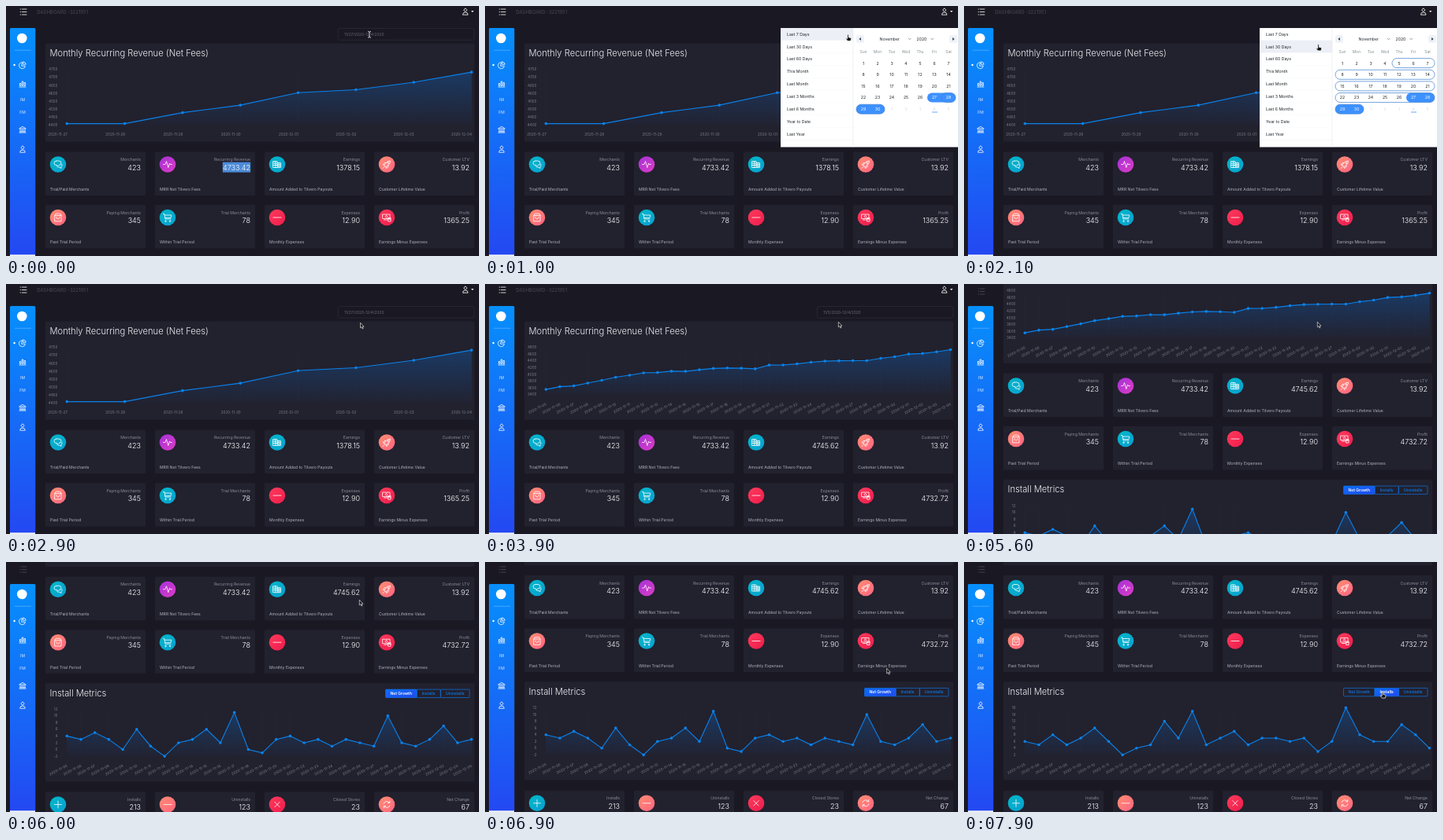
An HTML page for the animation above (8 s loop, 600 px wide and 318 px high).

```html
<!DOCTYPE html>
<html lang="en">
<head>
<meta charset="utf-8">
<title>Dashboard</title>
<style>
  html, body { margin: 0; width: 100%; height: 100%; overflow: hidden; background: #1a1923; }
  svg { display: block; width: 100vw; height: 100vh; }
  text { font-family: Inter, "Open Sans", sans-serif; font-weight: 400; }
  .title { font-size: 11.2px; font-weight: 300; fill: #f0f0f4; }
  .label { font-size: 5.15px; fill: #8e8d99; }
  .foot { font-size: 5.1px; fill: #b4b3bd; }
  .value { font-size: 9px; font-weight: 300; fill: #fff; }
  .tick { font-size: 4.6px; fill: #7f7e8b; }
  .icon { fill: none; stroke: #fff; stroke-width: .8; stroke-linecap: round; stroke-linejoin: round; }
  .pop { font-size: 5.2px; fill: #1d2429; }
  .end { text-anchor: end; }
  .mid { text-anchor: middle; }
</style>
</head>
<body>
<svg id="stage" viewBox="0 0 600 318" preserveAspectRatio="none"></svg>
<script>
const LOOP = 8000;
const POPUP_OPEN = 500, POPUP_CLOSE = 2900, RANGE_SET = 3300, TAB_CLICK = 7400;
const $ = id => document.getElementById(id);
const range = n => [...Array(n).keys()];
const text = (x, y, s, cls, extra = '') => `<text x="${x}" y="${y}" class="${cls}" ${extra}>${s}</text>`;
const rect = (x, y, w, h, fill, extra = '') =>
  `<rect x="${x}" y="${y}" width="${w}" height="${h}" fill="${fill}" ${extra}/>`;
const icon = (x, y, d, extra = '') => `<path class="icon" transform="translate(${x} ${y})" d="${d}" ${extra}/>`;

const gradients = {
  teal: ['#00b9c9', '#0a9fd0'], purple: ['#a532d8', '#dc3cc4'],
  coral: ['#ff8d72', '#ff6481'], red: ['#ff3b5c', '#ee1c4c'],
  side: ['#0690fc', '#2448f2'], tab: ['#0d6df5', '#2348f0']
};
const paths = {
  chat: 'M-2-4.5H1Q4-4.5 4-1.5Q4 1 1 1L-1 3V1H-2Q-5 1-5-1.7Q-5-4.5-2-4.5M0 3.5H2L4 5V3Q5.5 2 5 0',
  pulse: 'M-5.5 0H-3L-1.5-4L.8 4L2.5-1.5L3.4 0H5.5',
  coins: 'M-5-4H0V4H-5ZM-5-1.5H0M-5 1H0M0-2H4.5V4H0M0 0H4.5M0 2H4.5M-2.5-4V4M2.2-2V4',
  rocket: 'M-3 1Q-1-4 4.5-4.5Q4 1-1 3ZM-3 1L-5 .5L-3-2H-1M-1 3L-.5 5L2 3V1M-3 3L-5 5M1.8-2.8A1 1 0 1 0 1.9-2.8',
  bag: 'M-4-2.5L-2.8-4.8H2.8L4-2.5V4.8H-4ZM-4-2.5H4M-2-.5Q-2 2 0 2Q2 2 2-.5',
  cart: 'M-5.5-4.5H-4L-3 2H4M-3.7-3H4.8L4 .5H-3.2M-2.5 4A.8.8 0 1 0-2.4 4M3 4A.8.8 0 1 0 3.1 4',
  minus: 'M-5 0H5',
  cash: 'M-5-4H4V1.5H-5ZM-.5-2.6A1.4 1.4 0 1 0-.4-2.6M-3.5 3H.5M2 .5H5V5H2ZM2 2.2H5',
  plus: 'M-4.5 0H4.5M0-4.5V4.5',
  cross: 'M-3.2-3.2L3.2 3.2M3.2-3.2L-3.2 3.2',
  refresh: 'M-4-1A4.2 4.2 0 0 1 3.6-2M3.8-4.5V-2H1.3M4 1A4.2 4.2 0 0 1-3.6 2M-3.8 4.5V2H-1.3',
  pie: 'M-1-3.5A4 4 0 1 0 3.5 1H-1ZM1-4.3A3.8 3.8 0 0 1 4.3-1H1Z',
  bars: 'M-4 3.5H4M-3.6 1.5V-1H-2V1.5ZM-.8 1.5V-3.5H.8V1.5ZM2 1.5V-2H3.6V1.5Z',
  bank: 'M-4-1.5L0-4L4-1.5ZM-4 3.8H4M-3 2.5V-.3M-1 2.5V-.3M1 2.5V-.3M3 2.5V-.3M-3.5 2.5H3.5',
  user: 'M0-3.8A1.9 1.9 0 1 0 .1-3.8M-3.3 3.8Q-3.3 1 0 1Q3.3 1 3.3 3.8Z',
  menu: 'M-3.8-3.5H-3.2M-1.5-3.5H4M-3.8 0H-3.2M-1.5 0H4M-3.8 3.5H-3.2M-1.5 3.5H4'
};

const mrr = [3554, 3635, 3659, 3742, 3823, 3916, 3975, 4045, 4056, 4095, 4090, 4137, 4177, 4190, 4183,
  4165, 4277, 4280, 4312, 4360, 4394, 4405, 4409, 4409, 4478, 4525, 4604, 4622, 4669, 4733];
const growth = [4, 3, 5, 3, 0, 6, 1, -2, 2, 3, 6, 2, 11, 0, -1, 3, 4, 2, 3, 1, 3, 2, 1, 10, 2, 1, 3, 7, 2, 3];
const installs = [6, 5, 8, 5, 7, 10, 6, 2, 4, 5, 12, 7, 15, 5, 7, 9, 5, 7, 7, 6, 7, 3, 6, 16, 8, 6, 6, 11, 8, 4];
const dates = range(30).map(i => {
  const day = i + 5;
  return day <= 30 ? `2020-11-${String(day).padStart(2, '0')}` : `2020-12-0${day - 30}`;
});

// Every chart has eight ticks; top is the y of the highest one.
function chart(values, labels, top, rowHeight, max, step) {
  const bottom = top + 7 * rowHeight, slanted = labels.length > 10;
  const px = i => 77.3 + i * 513.2 / (values.length - 1);
  const py = v => top + (max - v) / step * rowHeight;
  const pts = values.map((v, i) => [px(i).toFixed(2), py(v).toFixed(2)]);
  const line = pts.map(p => p.join(' ')).join('L');
  return pts.map(([x]) => `<path d="M${x} ${top}V${bottom}" stroke="#292836" stroke-width=".5"/>`).join('') +
    `<path d="M${line}V${bottom}H${px(0)}Z" fill="url(#area)"/>` +
    `<path d="M${line}" fill="none" stroke="#0a82ea" stroke-width="1.1"/>` +
    pts.map(([x, y]) => `<circle cx="${x}" cy="${y}" r="1.8" fill="#0a82ea"/>`).join('') +
    range(8).map(k => text(65.5, top + k * rowHeight + 1.6, max - k * step, 'tick end')).join('') +
    labels.map((s, i) => slanted
      ? text(0, 0, s, 'tick end', `transform="translate(${px(i) + 1} ${bottom + 13.2}) rotate(-27)"`)
      : text(px(i) + .5, bottom + 14, s, 'tick end')).join('');
}

const cardX = [50, 189, 328, 467];
function card(col, y, color, glyph, label, value, foot, id = '') {
  const x = cardX[col];
  return rect(x, y, 127, 55.5, '#22212e', 'rx="1.5"') +
    `<circle cx="${x + 16}" cy="${y + 16}" r="10.3" fill="url(#${color})"/>` +
    icon(x + 16, y + 16, paths[glyph]) +
    text(x + 121, y + 11.6, label, 'label end') +
    text(x + 121, y + 23, value, 'value end', id && `id="${id}"`) +
    text(x + 6, y + 49.4, foot, 'foot');
}
const cardRow = (y, rows) => rows.map((r, i) => card(i, y, ...r)).join('');
const panel = (y, title) => rect(50, y, 544, 125.3, '#22212e', 'rx="1.5"') + text(55.5, y + 16.6, title, 'title');

function tabs(active) {
  const edges = [481.5, 521, 551.3, 588];
  return ['Net Growth', 'Installs', 'Uninstalls'].map((s, i) => {
    const on = i === active, x = edges[i], w = edges[i + 1] - x;
    return rect(x, 328.9, w, 10.4, on ? 'url(#tab)' : 'none', 'stroke="#0b74e8" stroke-width=".7" rx=".8"') +
      text(x + w / 2, 335.9, s, 'mid', `font-size="5" style="font-weight:${on ? 600 : 500}" fill="${on ? '#fff' : '#0b7df0'}"`);
  }).join('');
}

const presets = ['Last 7 Days', 'Last 30 Days', 'Last 60 Days', 'This Month', 'Last Month',
  'Last 3 Months', 'Last 6 Months', 'Year to Date', 'Last Year'];
const ROW = 15.85;
const dayX = c => 480 + 18 * c, dayY = r => 72.6 + 14.65 * r;

function daySpan(from, to, fill, stroke) {
  return range(5).map(r => {
    const a = Math.max(from, r * 7 + 1), b = Math.min(to, r * 7 + 7);
    return a > b ? '' : rect(dayX((a - 1) % 7) - 9, dayY(r) - 6, 18 * (b - a + 1), 12, fill,
      `rx="6" stroke="${stroke}" stroke-width=".7"`);
  }).join('');
}

function popup(hover) {
  const list = presets.map((s, i) =>
    rect(375, 28 + i * ROW, 92, ROW, i === hover ? '#eceff5' : '#fff') +
    `<path d="M375 ${28 + (i + 1) * ROW}h92" stroke="#eff2f7" stroke-width=".6"/>` +
    text(383, 37.7 + i * ROW, s, 'pop')).join('');
  const arrow = (x, dir) => rect(x - 5, 37, 10, 10, '#eff2f7', 'rx="2"') +
    `<path d="M${x - dir} 40l${2.6 * dir} 2l${-2.6 * dir} 2z" fill="#34495e"/>`;
  const chevron = x => `<path d="M${x} 41l1.7 1.8l1.7-1.8" fill="none" stroke="#7d8893" stroke-width=".8"/>`;
  const week = ['Sun', 'Mon', 'Tue', 'Wed', 'Thu', 'Fri', 'Sat']
    .map((s, c) => text(dayX(c), 60.3, s, 'mid', 'font-size="5" fill="#849095"')).join('');
  const days = range(35).map(i => {
    const fill = i >= 30 ? '#d5dce0' : i >= 26 ? '#fff' : '#1d2429';
    return text(dayX(i % 7), dayY(Math.floor(i / 7)) + 1.9, i < 30 ? i + 1 : i - 29, 'mid',
      `font-size="5.2" fill="${fill}"`);
  }).join('');
  return rect(375, 28, 225, 151.5, '#fff') + list +
    '<path d="M467 28v151.5" stroke="#e3e7ee" stroke-width=".6"/>' +
    arrow(476, -1) + arrow(594, 1) +
    text(500.5, 44, 'November', 'pop') + chevron(537) + text(547.5, 44, '2020', 'pop') + chevron(565.5) +
    week + daySpan(27, 30, '#3d91ff', 'none') + daySpan(hover ? 5 : 28, 30, 'none', '#3d7fd0') + days +
    rect(567, 134.6, 7, .8, '#3d91ff');
}

const cursors = {
  beam: '<path d="M-2-4Q0-4 0-2.5Q0-4 2-4M0-2.5V3M-2 4Q0 4 0 2.5Q0 4 2 4" fill="none" stroke="#d8d8dc" stroke-width=".9"/>',
  arrow: '<path d="M0 0V6.6L1.5 5.2L2.6 7.7L3.7 7.2L2.6 4.9H4.6Z" fill="#111" stroke="#fff" stroke-width=".6"/>',
  hand: '<path d="M-.8 0Q0-1 .8 0V3L3.6 3.6Q4.3 4 4 5.2L3.3 7.6H-.6L-2.9 4.6Q-2.6 3.6-.8 4.8Z" fill="#111" stroke="#fff" stroke-width=".7"/>'
};

const gradientDefs = Object.entries(gradients).map(([id, [a, b]]) =>
  `<linearGradient id="${id}" x1="0" y1="0" x2="${id === 'side' ? 0 : 1}" y2="1">` +
  `<stop stop-color="${a}"/><stop offset="1" stop-color="${b}"/></linearGradient>`).join('');

$('stage').innerHTML = `<defs>${gradientDefs}
  <linearGradient id="area" x1="0" y1="0" x2="0" y2="1">
    <stop stop-color="#0a72e0" stop-opacity=".3"/><stop offset="1" stop-color="#0a72e0" stop-opacity=".02"/>
  </linearGradient></defs>` +
  rect(0, 0, 600, 318, '#1a1923') +
  '<g id="page">' +
    icon(22, 7.5, paths.menu) +
    text(39.3, 9.6, 'DASHBOARD -3221951', '', 'font-size="6" fill="#4a4955"') +
    icon(582.7, 7, paths.user) + '<path d="M590 6h3.4l-1.7 2z" fill="#fff"/>' +
    rect(421.3, 28.5, 172.5, 14.8, '#1a1923', 'rx="2.5" stroke="#2d2c3a" stroke-width=".7"') +
    text(429, 37.7, '', '', 'id="dates" font-size="4.8" fill="#6a6975"') +
    panel(47.5, 'Monthly Recurring Revenue (Net Fees)') + '<g id="revenue"></g>' +
    cardRow(185.5, [
      ['teal', 'chat', 'Merchants', '423', 'Trial/Paid Merchants'],
      ['purple', 'pulse', 'Recurring Revenue', '4733.42', 'MRR Net Tilvero Fees', 'mrrValue'],
      ['teal', 'coins', 'Earnings', '', 'Amount Added to Tilvero Payouts', 'earnings'],
      ['coral', 'rocket', 'Customer LTV', '13.92', 'Customer Lifetime Value']]) +
    '<g id="selection">' + rect(274.8, 198.6, 35.4, 13, '#4c8bd8') + text(310, 208.5, '4733.42', 'value end') + '</g>' +
    cardRow(253, [
      ['coral', 'bag', 'Paying Merchants', '345', 'Past Trial Period'],
      ['teal', 'cart', 'Trial Merchants', '78', 'Within Trial Period'],
      ['red', 'minus', 'Expenses', '12.90', 'Monthly Expenses'],
      ['red', 'cash', 'Profit', '', 'Earnings Minus Expenses', 'profit']]) +
    panel(320.8, 'Install Metrics') + '<g id="tabs"></g><g id="metrics"></g>' +
    cardRow(459.3, [
      ['teal', 'plus', 'Installs', '213', ''],
      ['coral', 'minus', 'Uninstalls', '123', ''],
      ['red', 'cross', 'Closed Stores', '23', ''],
      ['coral', 'refresh', 'Net Change', '67', '']]) +
  '</g>' +
  icon(22, 9.5, paths.menu, 'id="dimMenu" style="stroke:#4f4e5a"') +
  rect(5, 28, 32.3, 290, 'url(#side)', 'rx="1.5"') +
  '<circle cx="20.3" cy="41" r="6.3" fill="#fff"/>' +
  '<path d="M11 56.3H32" stroke="#fff" stroke-opacity=".4" stroke-width=".6"/>' +
  '<circle cx="10.6" cy="75" r="1.2" fill="#fff"/>' +
  icon(21, 75.2, paths.pie) + icon(21, 99.5, paths.bars) +
  text(21, 121.2, 'IM', 'mid', 'font-size="5" fill="#e4eeff"') +
  text(21, 137, 'FM', 'mid', 'font-size="5" fill="#e4eeff"') +
  icon(21, 157.3, paths.bank) + icon(21, 182, paths.user) +
  rect(5, 316.3, 32, 1.7, '#f1f3f6') +
  '<g id="popup"></g><g id="cursor"></g>';

const cache = {};
function setHTML(id, key, make) {
  if (cache[id] === key) return;
  cache[id] = key;
  $(id).innerHTML = make();
}
const show = (id, on) => $(id).setAttribute('visibility', on ? 'visible' : 'hidden');
const smooth = u => u * u * (3 - 2 * u);

// Keys are [time, ...values]; eased between neighbours.
function track(keys, t, ease = smooth) {
  const i = keys.findIndex(k => k[0] > t);
  if (i < 0) return keys[keys.length - 1].slice(1);
  if (i === 0) return keys[0].slice(1);
  const a = keys[i - 1], b = keys[i], u = ease((t - a[0]) / (b[0] - a[0]));
  return a.slice(1).map((v, k) => v + (b[k + 1] - v) * u);
}
const scrollKeys = [[4300, 0], [4600, 34.8], [4900, 62], [5200, 71.7], [5600, 71.7], [5800, 122], [6000, 166.8], [6200, 168.5]];
const cursorKeys = [[0, 461, 36.3], [900, 461, 36.3], [1700, 449.5, 49.3], [2900, 449.5, 49.3],
  [3300, 448.3, 48.3], [6300, 448.3, 48.3], [7200, 531, 165.5]];

function render(t) {
  const month = t >= RANGE_SET, open = t >= POPUP_OPEN && t < POPUP_CLOSE;
  const [scroll] = track(scrollKeys, t, u => u);
  const [cx, cy] = track(cursorKeys, t);

  $('page').setAttribute('transform', `translate(0 ${-scroll})`);
  show('dimMenu', t >= 5000);
  show('selection', t < POPUP_OPEN);
  $('dates').textContent = month ? '11/5/2020-12/4/2020' : '11/27/2020-12/4/2020';
  $('earnings').textContent = month ? '4745.62' : '1378.15';
  $('profit').textContent = month ? '4732.72' : '1365.25';
  setHTML('revenue', month, () => month
    ? chart(mrr, dates, 80.7, 8.57, 4800, 200)
    : chart(mrr.slice(-8), dates.slice(-8), 80.7, 10.1, 4750, 50));

  const clicked = t >= TAB_CLICK;
  const morph = clicked ? 1 - (1 - Math.min(1, (t - TAB_CLICK) / 400)) ** 4 : 0;
  setHTML('tabs', clicked, () => tabs(clicked ? 1 : 0));
  // Both scales share a row height, so the offset of 4 keeps the line continuous.
  setHTML('metrics', clicked + ':' + morph, () => clicked
    ? chart(installs.map((v, i) => growth[i] + 4 + (v - growth[i] - 4) * morph), dates, 353.9, 8.57, 16, 2)
    : chart(growth, dates, 353.9, 8.57, 12, 2));

  show('popup', open);
  const hover = Math.floor((cy - 28) / ROW);
  if (open) setHTML('popup', hover, () => popup(hover));

  const shape = t < POPUP_OPEN ? 'beam' : open || t > 7100 ? 'hand' : 'arrow';
  setHTML('cursor', shape, () => cursors[shape]);
  $('cursor').setAttribute('transform', `translate(${cx} ${cy})`);
}

const start = performance.now();
function frame() {
  render((performance.now() - start) % LOOP);
  requestAnimationFrame(frame);
}
frame();
</script>
</body>
</html>
```
